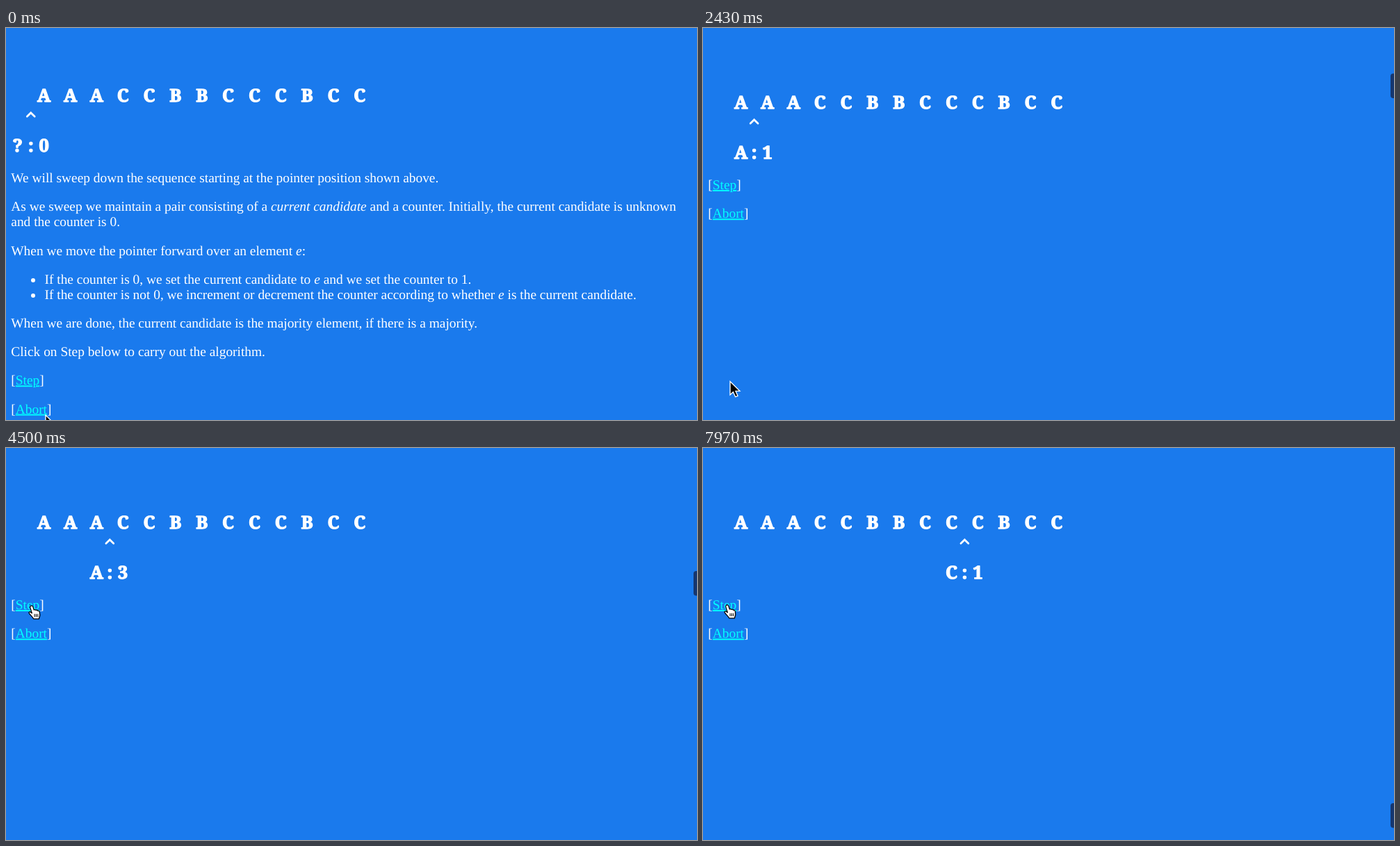
Recreate the animation shown at these times as an HTML page. Size 994 px wide and 564 px high, loop 8000 ms.

```html
<!DOCTYPE html>
<html lang="en">
<head>
<meta charset="utf-8">
<title>Majority vote</title>
<style>
  html, body { margin: 0; width: 100%; height: 100%; overflow: hidden; background: #1a7aed; }
  svg { display: block; width: 994px; height: 564px; }
  text {
    font: 19.4px "Liberation Serif", Times, serif;
    fill: #fff;
    text-rendering: geometricPrecision;
    white-space: pre;
  }
  .mono {
    font: bold 25.5px "Noto Serif", serif;
    text-anchor: middle;
    stroke: #fff;
    stroke-width: 1.3px;
    stroke-linejoin: round;
  }
  .link { fill: #0ff; text-decoration: underline; text-decoration-thickness: 1.2px; }
  .link.active { fill: #f00; }
  .em { font-style: italic; }
</style>
</head>
<body>
<svg viewBox="0 0 994 564">
  <g id="board">
    <text id="sequence" class="mono" y="105.6"></text>
    <path id="caret" d="M-5.4 127.2 0 122 5.4 127.2" fill="none" stroke="#fff" stroke-width="2.8" stroke-linecap="round"/>
    <text id="pair" class="mono" y="177.8"></text>
  </g>
  <g id="intro">
    <text x="7.3" y="222">We will sweep down the sequence starting at the pointer position shown above.</text>
    <text x="7.3" y="263.3">As we sweep we maintain a pair consisting of a <tspan class="em">current candidate</tspan> and a counter. Initially, the current candidate is unknown</text>
    <text x="7.3" y="285">and the counter is 0.</text>
    <text x="7.3" y="326.5">When we move the pointer forward over an element <tspan class="em">e</tspan>:</text>
    <circle cx="39" cy="363" r="3" fill="#fff"/>
    <text x="55.5" y="367.7">If the counter is 0, we set the current candidate to <tspan class="em">e</tspan> and we set the counter to 1.</text>
    <circle cx="39" cy="385" r="3" fill="#fff"/>
    <text x="55.5" y="389.5">If the counter is not 0, we increment or decrement the counter according to whether <tspan class="em">e</tspan> is the current candidate.</text>
    <text x="7.3" y="431">When we are done, the current candidate is the majority element, if there is a majority.</text>
    <text x="7.3" y="472">Click on Step below to carry out the algorithm.</text>
  </g>
  <g id="links">
    <text x="7.3" y="232">[<tspan id="step" class="link">Step</tspan>]</text>
    <text x="7.3" y="273.3">[<tspan class="link">Abort</tspan>]</text>
  </g>
  <rect id="scrollbar" x="989" width="10" height="35.5" rx="4" fill="#16376f"/>
  <g id="cursor">
    <path id="arrow" transform="scale(1.1)" d="M0 0V17.5L4 13.8 6.9 20.2 10 18.9 7.2 12.6H12.7Z" fill="#000" stroke="#fff" stroke-width="1.2"/>
    <g id="hand" transform="scale(1.06)" stroke="#000" stroke-width="1.2" stroke-linejoin="round">
      <path fill="#fff" d="M3 1.5C4 .3 5.8.6 6.3 2L7.8 6.6C8.6 5.9 9.9 6.1 10.4 7 11.3 6.4 12.4 6.8 12.8 7.8 14 7.4 15.2 8.2 15.4 9.6L15.8 13.5C15.9 15.5 14.8 16.4 14.5 18.8H7.2C6.5 16.5 3.5 14.5 1.2 11.3.2 9.8 2 8.6 3.3 9.6L5 11 2.7 3.6C2.4 2.7 2.5 2 3 1.5Z"/>
      <path d="M8.6 12V16M10.8 12V16M13 12V16" stroke-width="1"/>
    </g>
  </g>
</svg>
<script>
const LOOP = 8000;
const SEQUENCE = "AAACCBBCCCBCC";
const CELL = 18.92;
const PRESS = 150, BAR_HOLD = 400, BAR_FADE = 250, HAND_FROM = 3250;

// Moments at which the pointer moves over the next element.
const stepTimes = [2130, 3600, 4430, 5130, 5690, 6250, 6810, 7370, 7930];

// Mouse path: time, x, y.
const mousePath = [
  [0, 57, 557], [100, 56, 555], [800, 34, 507.5], [1300, 34, 507.5], [1900, 39, 508.5],
  [2430, 39, 508.5], [2870, 60.5, 217], [3300, 33, 226], [4500, 32, 226], [5700, 30, 225], [8000, 30, 225]
];

const el = Object.fromEntries([...document.querySelectorAll("[id]")].map(e => [e.id, e]));
const cellX = i => 7.4 + CELL * (i + 0.5);
const show = (node, on) => node.setAttribute("display", on ? "inline" : "none");
const move = (node, x, y) => node.setAttribute("transform", `translate(${x} ${y})`);
const clamp = v => Math.min(1, Math.max(0, v));

el.sequence.textContent = SEQUENCE;
el.sequence.setAttribute("x", [...SEQUENCE].map((_, i) => cellX(2 + 2 * i)).join(" "));

function majorityPair(length) {
  let candidate = "?", count = 0;
  for (const letter of SEQUENCE.slice(0, length)) {
    if (count === 0) candidate = letter;
    count += letter === candidate ? 1 : -1;
  }
  return `${count ? candidate : "?"}:${count}`;
}

function mouseAt(t) {
  const i = mousePath.findIndex(([time]) => time > t);
  const [t0, x0, y0] = mousePath[i - 1], [t1, x1, y1] = mousePath[i];
  const p = (t - t0) / (t1 - t0), ease = p * p * (3 - 2 * p);
  return [x0 + (x1 - x0) * ease, y0 + (y1 - y0) * ease];
}

function render(t) {
  const done = stepTimes.filter(time => time <= t).length;
  const started = done > 0;

  move(el.board, 0, started ? 10 : 0);
  move(el.links, 0, started ? 0 : 281.3);
  show(el.intro, !started);
  move(el.caret, cellX(2 * done + 1), 0);
  el.pair.textContent = majorityPair(done);
  el.pair.setAttribute("x", [0, 1, 2].map(i => cellX(2 * done + i)).join(" "));
  el.step.classList.toggle("active", stepTimes.some(time => t >= time - PRESS && t < time));

  const barAge = started ? t - stepTimes[done - 1] : Infinity;
  el.scrollbar.setAttribute("y", 9.8 + 55.7 * done);
  el.scrollbar.setAttribute("opacity", 1 - clamp((barAge - BAR_HOLD) / BAR_FADE));

  move(el.cursor, ...mouseAt(t));
  show(el.arrow, t < HAND_FROM);
  show(el.hand, t >= HAND_FROM);
}

const start = performance.now();
function tick() {
  render((performance.now() - start) % LOOP);
  requestAnimationFrame(tick);
}
tick();
</script>
</body>
</html>
```
